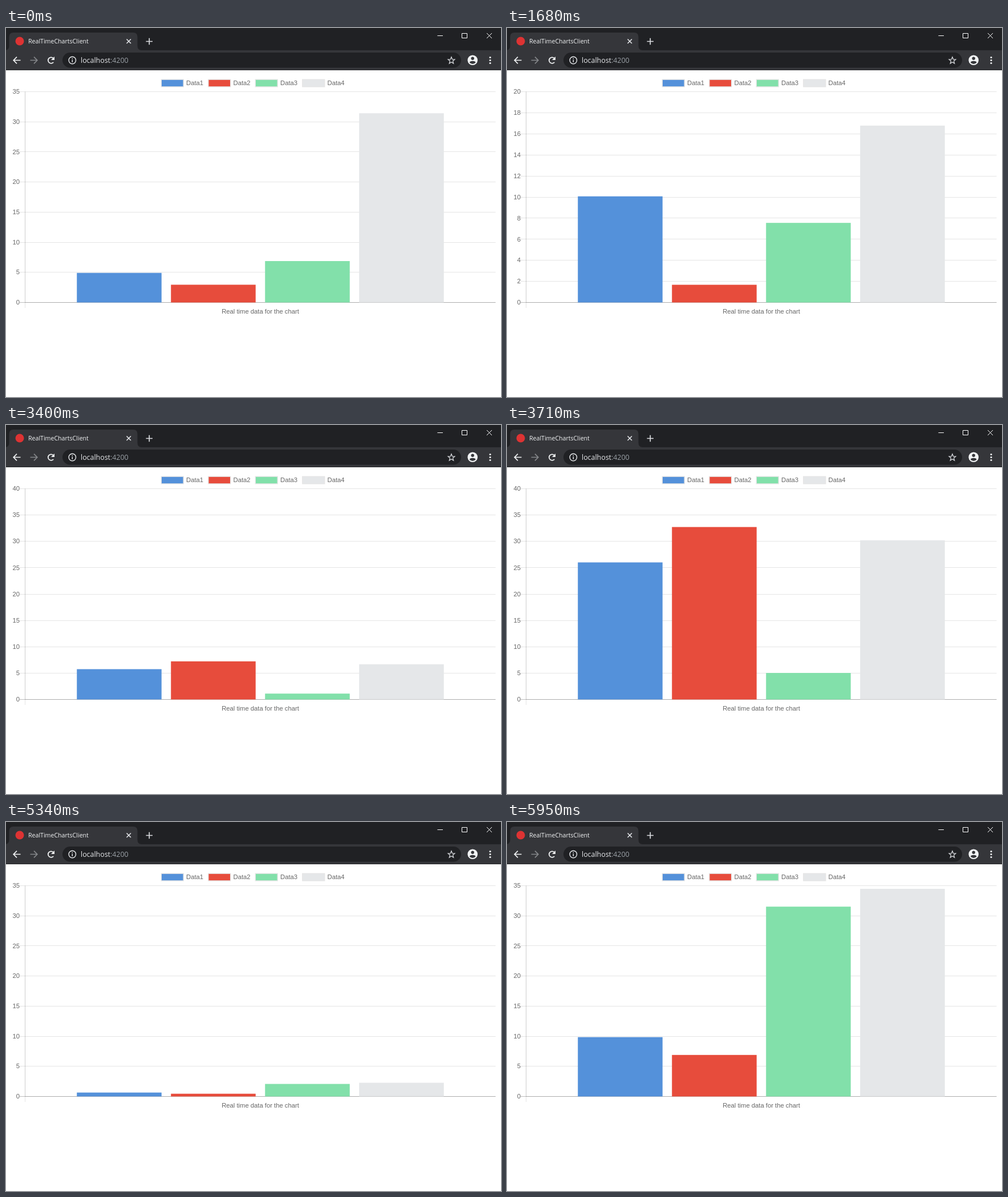
These frames come from a looping animation (868 by 646 pixels, 6.03 s). An HTML page with a canvas:

```html
<!DOCTYPE html>
<html lang="en">
<head>
<meta charset="utf-8">
<title>Real time chart</title>
<style>
  html, body { margin: 0; width: 868px; height: 646px; overflow: hidden; background: #fff; }
  canvas { display: block; }
</style>
</head>
<body>
<canvas id="stage" width="868" height="646"></canvas>
<script>
const ctx = document.getElementById('stage').getContext('2d');
const LOOP = 6030;
const STEP_MS = 16.05;
const CHART_FONT = '11.25px "Liberation Sans", Arial, sans-serif';
const COLORS = ['#5491DA', '#E74C3C', '#82E0AA', '#E5E7E9'];
const AREA = { left: 33.5, right: 858.5, top: 111.5, bottom: 480.5 };

// Each update grows its bars from zero in 60 steps; holds are the times between redraws.
const UPDATES = [
  { at: 0, step: 38, values: [5, 3, 7, 32], max: 35, tick: 5, holds: [70, 50] },
  { at: 1360, step: 2, values: [12, 2, 9, 20], max: 20, tick: 2,
    holds: [90, 70, 80, 80, 80, 80, 80, 80, 70, 80, 70] },
  { at: 3400, step: 3, values: [31, 39, 6, 36], max: 40, tick: 5,
    holds: [70, 80, 80, 70, 80, 80, 80, 70, 80, 80, 80] },
  { at: 5340, step: 1, values: [10, 7, 32, 35], max: 35, tick: 5,
    holds: [70, 80, 80, 80, 70, 80, 80, 70] }
];

const easeOutQuart = x => 1 - (1 - x) ** 4;

function rect(x, y, w, h, color) {
  ctx.fillStyle = color;
  ctx.fillRect(x, y, w, h);
}

function disc(x, y, r, color) {
  ctx.fillStyle = color;
  ctx.beginPath();
  ctx.arc(x, y, r, 0, Math.PI * 2);
  ctx.fill();
}

function stroke(path, color, width) {
  ctx.strokeStyle = color;
  ctx.lineWidth = width;
  ctx.stroke(new Path2D(path));
}

function text(str, x, y, color, font, align = 'left') {
  ctx.font = font;
  ctx.fillStyle = color;
  ctx.textAlign = align;
  ctx.fillText(str, x, y);
}

function drawWindowBar() {
  rect(0, 0, 868, 39, '#202124');
  rect(0, 39, 868, 34, '#35363a');
  rect(0, 73, 868, 1, '#28292c');

  ctx.fillStyle = '#35363a';
  ctx.fill(new Path2D('M-2 39Q5.500 39 5.500 31V15.500Q5.500 8 13 8H223Q230.500 8 230.500 15.500V31Q230.500 39 238 39Z'));
  disc(24, 23, 7.5, '#dd3333');
  text('RealTimeChartsClient', 39, 27, '#f1f3f4', '10.6px "Open Sans", sans-serif');
  stroke('M211.500 19.500L219 27M219 19.500L211.500 27', '#e8eaed', 1.5);
  stroke('M245.500 23.500H257M251.250 17.750V29.250', '#dadce0', 1.7);

  stroke('M756.500 13.500H766M799.500 9.500H808.500V17.500H799.500ZM843 9L852 18M852 9L843 18', '#fff', 1);
}

function drawToolbar() {
  stroke('M25.500 56.500H13.500M19 50.700L13.200 56.500L19 62.300', '#f1f3f4', 1.7);
  stroke('M42.500 56.500H54.500M49 50.700L54.800 56.500L49 62.300', '#85878a', 1.7);
  stroke('M83.200 60A5.300 5.300 0 1 1 82.600 52.600', '#f1f3f4', 1.8);
  ctx.fillStyle = '#f1f3f4';
  ctx.fill(new Path2D('M85 50V56H79Z'));

  ctx.fillStyle = '#202124';
  ctx.beginPath();
  ctx.roundRect(99, 43, 699, 26.5, 13.25);
  ctx.fill();
  stroke('M122.500 56.500A6.200 6.200 0 1 1 110.100 56.500A6.200 6.200 0 1 1 122.500 56.500M116.300 55.500V60M116.300 52.700V54.200', '#e8eaed', 1.4);

  const urlFont = '12.4px "Open Sans", sans-serif';
  text('localhost', 131, 61, '#e8eaed', urlFont);
  text(':4200', 131 + ctx.measureText('localhost').width, 61, '#9aa0a6', urlFont);

  let star = '';
  for (let i = 0; i < 10; i++) {
    const angle = (i / 5 - 0.5) * Math.PI, r = i % 2 ? 2.7 : 6.3;
    star += (i ? 'L' : 'M') + (781 + r * Math.cos(angle)) + ' ' + (57 + r * Math.sin(angle));
  }
  stroke(star + 'Z', '#dadce0', 1.2);

  disc(818.2, 56.3, 8.8, '#f1f3f4');
  disc(818.2, 53.2, 2.7, '#35363a');
  ctx.fillStyle = '#35363a';
  ctx.fill(new Path2D('M812.800 60.200Q814.200 57.800 818.200 57.800T823.600 60.200Q821.500 63 818.200 63T812.800 60.200Z'));
  for (const y of [51.5, 56.5, 61.5]) disc(849, y, 1.6, '#f1f3f4');
}

function drawLegend() {
  COLORS.forEach((color, i) => {
    const x = 273 + i * 82.5;
    rect(x - 1.4, 89.5, 40.3, 14.1, '#e5e5e5');
    rect(x, 90.9, 37.5, 11.3, color);
    text('Data' + (i + 1), x + 43.1, 99.7, '#666', CHART_FONT);
  });
}

function drawAxes(max, tick) {
  const { left, right, top, bottom } = AREA;
  for (let v = 0; v <= max; v += tick) {
    const y = bottom - v / max * (bottom - top);
    rect(24, Math.round(y - 0.5), right - 24, 1, v ? 'rgba(0,0,0,.1)' : 'rgba(0,0,0,.25)');
    text(String(v), 24, y + 3.7, '#666', CHART_FONT, 'right');
  }
  rect(33, top, 1, 378.5, 'rgba(0,0,0,.1)');
  rect(33, top, 1, bottom - top, 'rgba(0,0,0,.1)');
  rect(left, 480, right - left, 1, 'rgba(0,0,0,.1)');
  text('Real time data for the chart', 446, 499.7, '#666', CHART_FONT, 'center');
}

function drawBars(values, max, progress) {
  const { left, right, top, bottom } = AREA;
  const slot = (right - left) * 0.8 / values.length;
  values.forEach((value, i) => {
    const height = value * progress / max * (bottom - top);
    rect(left + (right - left) * 0.1 + slot * (i + 0.05), bottom - height, slot * 0.9, height, COLORS[i]);
  });
}

function draw(time) {
  const update = UPDATES.filter(u => u.at <= time).pop();
  let shown = update.at;
  for (const hold of update.holds) {
    if (shown + hold > time) break;
    shown += hold;
  }
  const step = Math.min(60, update.step + Math.round((shown - update.at) / STEP_MS));

  rect(0, 0, 868, 646, '#fff');
  drawWindowBar();
  drawToolbar();
  drawLegend();
  drawAxes(update.max, update.tick);
  drawBars(update.values, update.max, easeOutQuart(step / 60));
}

const start = performance.now();
function frame() {
  draw((performance.now() - start) % LOOP);
  requestAnimationFrame(frame);
}
frame();
</script>
</body>
</html>
```
